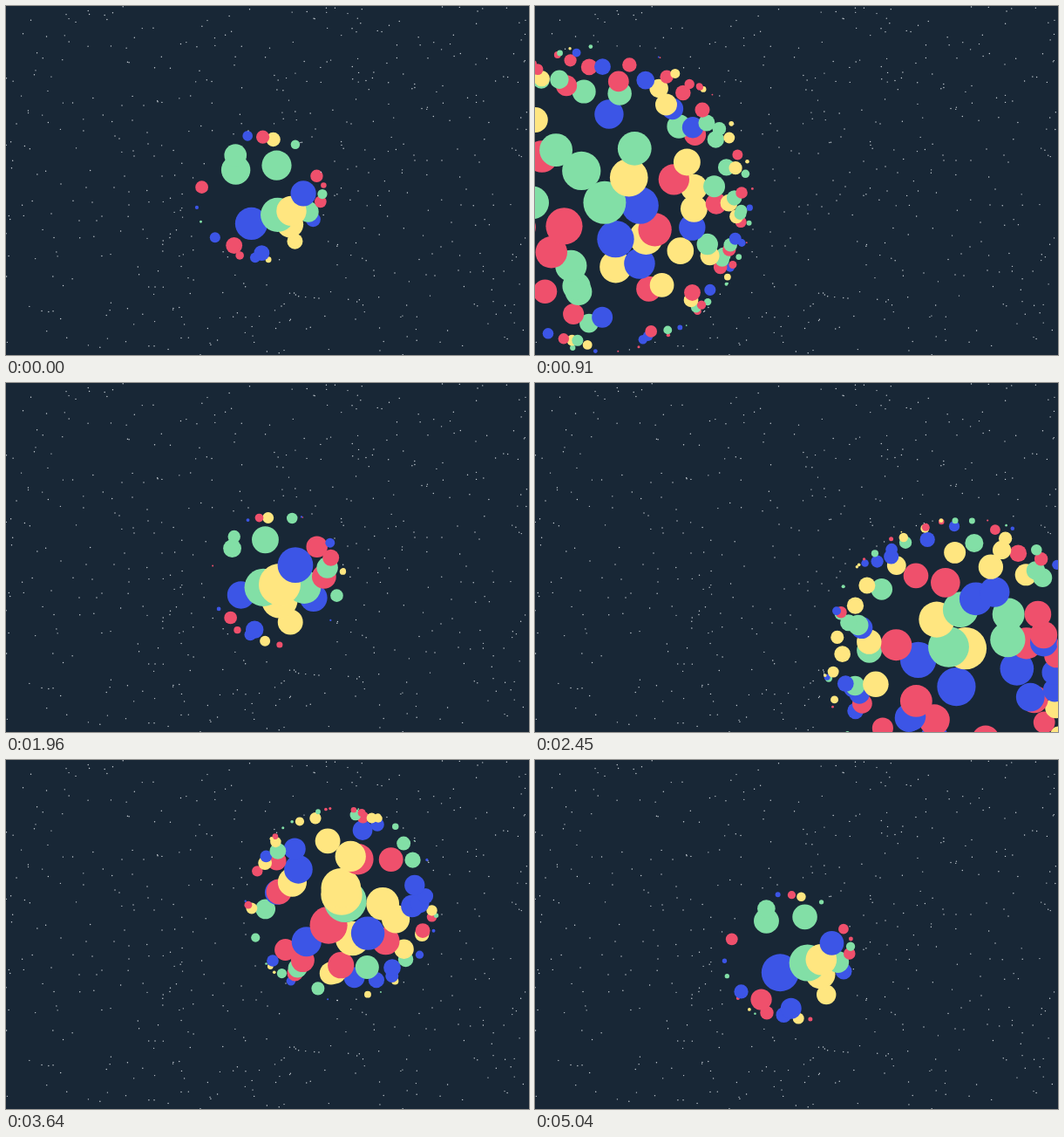
Animation, 600 px wide and 400 px high, one loop 5.11 s. Source, as an HTML page with a canvas:

```html
<!DOCTYPE html>
<html lang="en">
<head>
<meta charset="utf-8">
<title>Lens over a star field</title>
<style>
  html, body { margin: 0; width: 100%; height: 100%; overflow: hidden; background: #182736; }
  canvas { display: block; width: 600px; height: 400px; }
</style>
</head>
<body>
<canvas id="stage" width="600" height="400"></canvas>
<script>
const W = 600, H = 400, LOOP = 5110, STEP = 70;
const BACK = '#182736', STAR = '#c9d0d6', MAX_SIZE = 25, COUNT = 520;
const ctx = document.getElementById('stage').getContext('2d');

// Resting places (x, y) of the prominent dots, by colour
const groups = {
  '#ef506c': [270,259, 272,275, 240,210, 294,166, 342,200, 346,223, 377,178, 416,191,
    396,135, 356,207, 518,164, 469,177, 446,306, 52,238, 110,241, 124,208,
    145,131, 162,145, 133,114, 158,114, 147,172],
  '#82dfa6': [303,230, 329,230, 303,197, 275,200, 273,187, 350,216, 325,169, 404,212,
    500,177, 483,177, 538,171, 482,308, 489,284, 519,303, 63,204, 163,158,
    170,172, 179,195],
  '#ffe680': [313,228, 313,238, 321,256, 300,282, 303,169, 392,187, 391,133, 351,150,
    468,171, 528,210, 522,228, 511,248, 492,309, 92,208, 104,246, 136,195,
    141,213, 141,228, 125,149],
  '#3c55e6': [286,236, 323,216, 337,238, 293,266, 287,275, 250,256, 280,162, 402,184,
    355,141, 543,179, 512,270, 499,276, 99,225, 84,246, 146,166, 130,152]
};

// Lens centre over time: ms, x, y
const path = [
  [0, 292, 218], [450, 180, 254], [910, 74, 221], [1190, 84, 171], [1470, 140, 153],
  [1960, 312, 225], [2450, 490, 314], [2740, 540, 250], [3010, 508, 178],
  [3640, 385, 165], [4080, 312, 209], [4340, 292, 226], [4480, 291.5, 227], [5110, 291.5, 227]
];

let seed = 4127;
function random() {
  seed = (seed * 1664525 + 1013904223) % 4294967296;
  return seed / 4294967296;
}

function makeDots() {
  const colors = Object.keys(groups);
  const dots = [];
  for (const color of colors) {
    const list = groups[color];
    for (let i = 0; i < list.length; i += 2) dots.push({ x: list[i], y: list[i + 1], color });
  }
  const fixed = dots.slice();
  while (dots.length < COUNT) {
    const x = random() * W, y = random() * H;
    const color = colors[Math.floor(random() * 4)];
    const crowded = Math.hypot(x - 292, y - 223) < 62 ||
      fixed.some(d => Math.hypot(x - d.x, y - d.y) < 13);
    if (!crowded) dots.push({ x, y, color });
  }
  return dots.sort((a, b) => b.y - a.y);
}

function slope(i, axis) {
  const a = path[Math.max(i - 1, 0)], b = path[Math.min(i + 1, path.length - 1)];
  return (b[axis] - a[axis]) / (b[0] - a[0]);
}

function along(t, axis) {
  let i = 0;
  while (i < path.length - 2 && t >= path[i + 1][0]) i++;
  const a = path[i], b = path[i + 1], span = b[0] - a[0];
  const u = (t - a[0]) / span, v = 1 - u;
  return v * v * (1 + 2 * u) * a[axis] + u * u * (3 - 2 * u) * b[axis] +
    span * u * v * (v * slope(i, axis) - u * slope(i + 1, axis));
}

const dots = makeDots();

function draw(t) {
  const cx = along(t, 1), cy = along(t, 2);
  const reach = 71 + 0.466 * Math.abs(cx - W / 2);
  ctx.fillStyle = BACK;
  ctx.fillRect(0, 0, W, H);
  for (const d of dots) {
    const dx = d.x - cx, dy = d.y - cy;
    const pull = Math.max(0, 1 - Math.hypot(dx, dy) / reach);
    ctx.fillStyle = pull > 0.03 ? d.color : STAR;
    ctx.beginPath();
    ctx.arc(d.x + dx * pull, d.y + dy * pull, Math.max(0.7, MAX_SIZE * pull), 0, Math.PI * 2);
    ctx.fill();
  }
}

const start = performance.now();
function tick() {
  const t = (performance.now() - start) % LOOP;
  draw(Math.floor(t / STEP) * STEP);
  requestAnimationFrame(tick);
}
tick();
</script>
</body>
</html>
```
